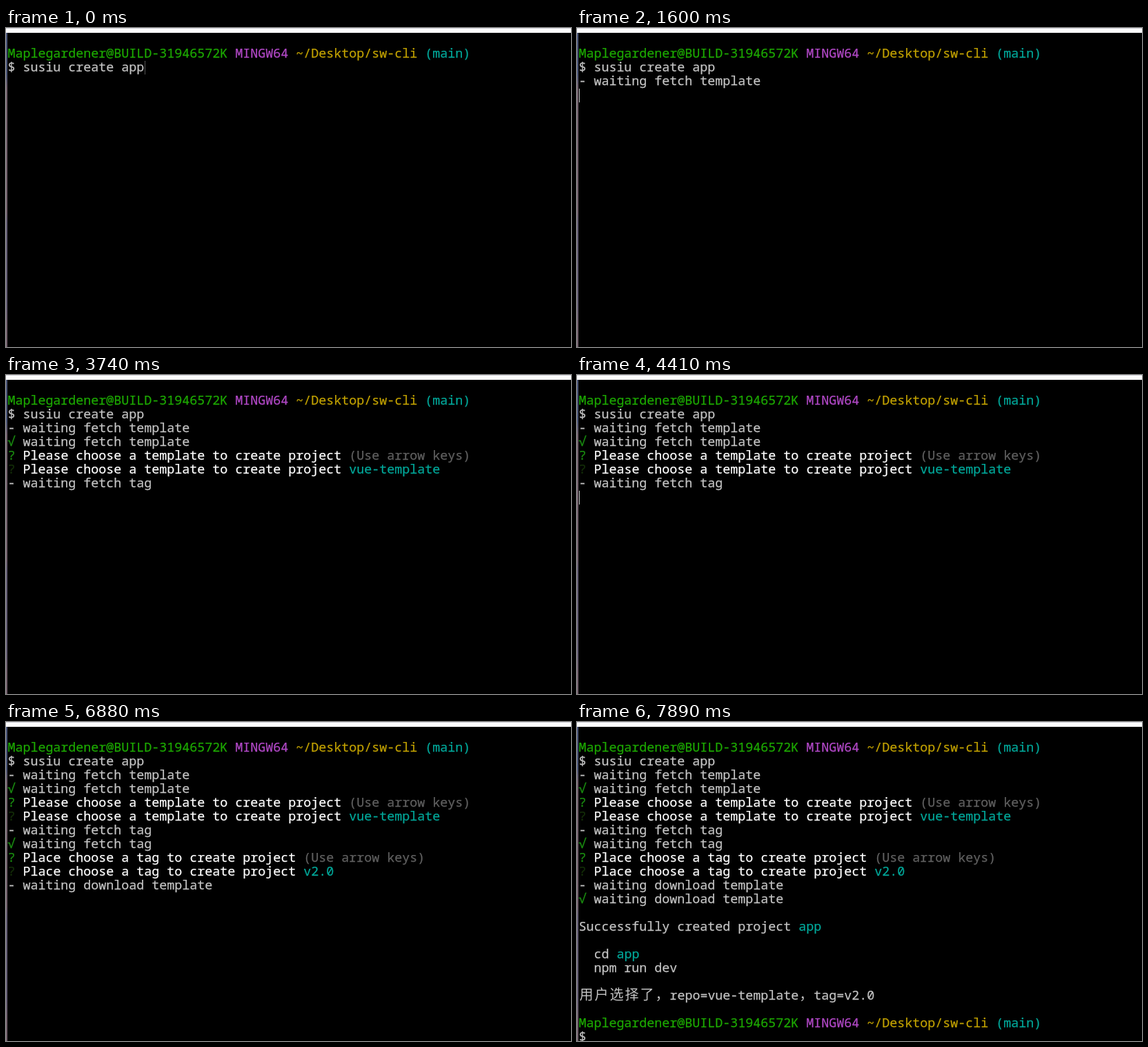
Write an HTML page that moves like this. It is 819x463 px and loops after 8 s.

```html
<!DOCTYPE html>
<html lang="en">
<meta charset="utf-8">
<title>Terminal session</title>
<style>
  html, body { margin: 0; width: 100%; height: 100%; overflow: hidden; background: #000; }
  #bar { position: absolute; inset: 0 0 auto; height: 6px; background: #fdfdfe; border-top: 1px solid #d3d3da; }
  #edge {
    position: absolute; left: 0; top: 7px; bottom: 0; width: 2px;
    background: linear-gradient(#4c587c 0 60px, #75626f 80px 260px, #676079 275px 395px, #75626f 425px);
  }
  #screen {
    position: absolute; left: 2.4px; top: 26px; color: #c4c4c4; white-space: pre;
    font: 18.333px/20px "Noto Sans Mono", "DejaVu Sans Mono", monospace;
    font-variant-ligatures: none; -webkit-text-stroke: .25px;
  }
  #screen div { height: 20px; }
  #screen i {
    display: inline-block; width: 22px; text-align: center; -webkit-text-stroke: 0;
    font: 300 20px/18px "Noto Sans CJK SC", "Noto Sans CJK", sans-serif;
  }
  #cursor { position: absolute; width: 1px; height: 20px; background: #c8c8c8; }
  #cursor.dotted { background: repeating-linear-gradient(#a8a8a8 0 1px, #000 1px 2px); }
</style>
<div id="bar"></div>
<div id="edge"></div>
<div id="screen"></div>
<div id="cursor"></div>
<script>
const LOOP = 8000, BLINK = 530, CELL = 11, ROW = 20;
const screenEl = document.getElementById('screen');
const cursorEl = document.getElementById('cursor');

const paint = color => text => `<span style="color:${color}">${text}</span>`;
const green = paint('#1ca800'), purple = paint('#b148c6'), yellow = paint('#c0a000');
const cyan = paint('#00a89a'), white = paint('#fff'), gray = paint('#606060');
const mark = paint('#1a8c10'), dimMark = paint('#142f08');
const wide = text => [...text].map(c => `<i>${c}</i>`).join('');

const prompt = [green('Maplegardener@BUILD-31946572K'), purple('MINGW64'),
  yellow('~/Desktop/sw-cli'), cyan('(main)')].join(' ');
const waiting = job => `- waiting ${job}`;
const done = job => `${mark('√')} waiting ${job}`;
const ask = question => `${mark('?')} ${white(question)} ${gray('(Use arrow keys)')}`;
const answer = (question, choice) => `${dimMark('?')} ${white(question)} ${cyan(choice)}`;

const pickTemplate = 'Please choose a template to create project';
const pickTag = 'Place choose a tag to create project';
const log = [
  prompt,
  '$ susiu create app',
  waiting('fetch template'),
  done('fetch template'),
  ask(pickTemplate),
  answer(pickTemplate, 'vue-template'),
  waiting('fetch tag'),
  done('fetch tag'),
  ask(pickTag),
  answer(pickTag, 'v2.0'),
  waiting('download template'),
  done('download template'),
  '',
  `Successfully created project ${cyan('app')}`,
  '',
  `  cd ${cyan('app')}`,
  '  npm run dev',
  '',
  `${wide('用户选择了，')}repo=vue-template${wide('，')}tag=v2.0`,
  '',
  prompt,
  '$ ',
];

// start time, log lines shown, open menu, cursor column and row
const stages = [
  { start: -300, lines: 2, col: 18, row: 1, dotted: true },
  { start: 470, lines: 2, col: 0, row: 2 },
  { start: 1270, lines: 3, col: 0, row: 3 },
  { start: 2140, lines: 5, menu: [cyan('&gt; vue-template'), '  vue3.0-template '], col: 18, row: 6 },
  { start: 2980, lines: 7, col: 0, row: 7 },
  { start: 4450, lines: 9, menu: [cyan('&gt; v2.0')], col: 7, row: 9 },
  { start: 4800, lines: 11, col: 0, row: 11 },
  { start: 7140, lines: 22, col: 2, row: 21 },
];

let shown;
function show(stage) {
  shown = stage;
  const lines = [...log.slice(0, stage.lines), ...(stage.menu || [])];
  screenEl.innerHTML = lines.map(line => `<div>${line}</div>`).join('');
  cursorEl.style.left = 3 + CELL * stage.col + 'px';
  cursorEl.style.top = 28 + ROW * stage.row + 'px';
  cursorEl.className = stage.dotted ? 'dotted' : '';
}

function tick() {
  const time = performance.now() % LOOP;
  const stage = stages.findLast(s => s.start <= time);
  if (stage !== shown) show(stage);
  const lit = Math.floor((time - stage.start) / BLINK) % 2 === 0;
  cursorEl.style.visibility = lit ? 'visible' : 'hidden';
  requestAnimationFrame(tick);
}
tick();
</script>
</html>
```
